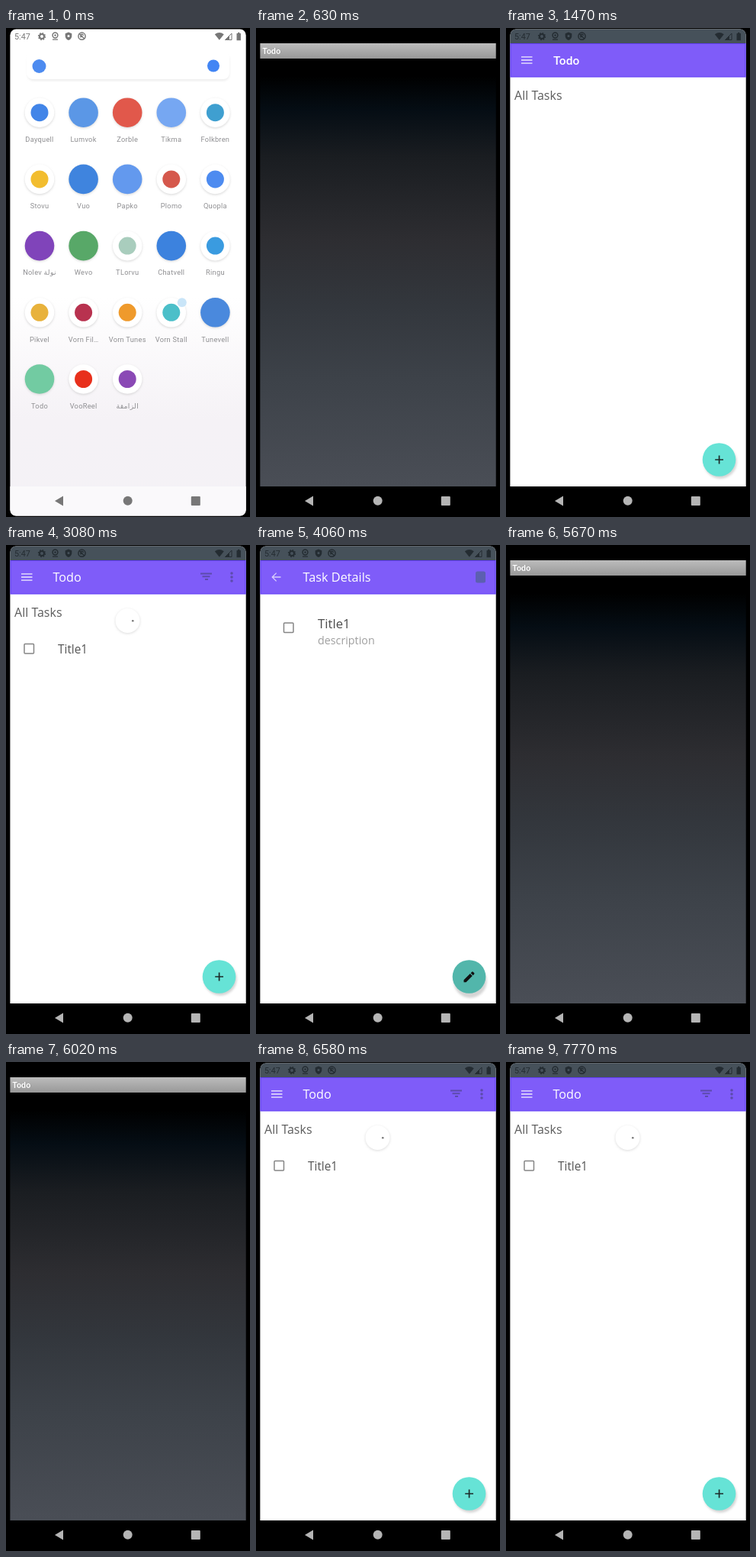
An HTML page that plays this animation: 320 px wide and 640 px high, repeating every 8000 ms.

```html
<!DOCTYPE html>
<html lang="en">
<head>
<meta charset="utf-8">
<title>Todo app</title>
<style>
html, body { margin: 0; height: 100%; overflow: hidden; background: #000; }
svg { display: block; width: 320px; height: 640px; }
text { font-family: "Open Sans", "Noto Sans", sans-serif; }
.ui { font-family: Roboto, sans-serif; }
.label { font: 9.3px Roboto, "DejaVu Sans", sans-serif; letter-spacing: .25px; fill: #8f8f92; text-anchor: middle; }
.line { fill: none; stroke-width: 1.5; }
</style>
</head>
<body>
<svg viewBox="0 0 320 640">
  <defs>
    <linearGradient id="paper" x2="0" y2="1">
      <stop offset=".55" stop-color="#fff"/><stop offset=".8" stop-color="#f5f2f6"/><stop offset="1" stop-color="#f4f2f6"/>
    </linearGradient>
    <linearGradient id="bar" x2="0" y2="1">
      <stop stop-color="#bcbcbc"/><stop offset="1" stop-color="#989898"/>
    </linearGradient>
    <linearGradient id="night" x2="0" y2="1">
      <stop offset=".04" stop-color="#000"/><stop offset=".12" stop-color="#050d14"/>
      <stop offset=".23" stop-color="#1a1d21"/><stop offset=".42" stop-color="#2d2d31"/>
      <stop offset=".58" stop-color="#33373d"/><stop offset=".75" stop-color="#3d4249"/>
      <stop offset="1" stop-color="#4a4e56"/>
    </linearGradient>
    <clipPath id="screen"><rect x="5.4" y="1.4" width="309.3" height="637.2" rx="8"/></clipPath>
    <filter id="soft" x="-30%" y="-30%" width="160%" height="160%"><feGaussianBlur stdDeviation="1.8"/></filter>
  </defs>
  <rect width="320" height="640"/>
  <g clip-path="url(#screen)">
    <g id="home">
      <rect width="320" height="640" fill="url(#paper)"/>
      <rect y="600" width="320" height="40" fill="#faf9fb"/>
      <rect x="28" y="34" width="265" height="35" rx="8" fill="#ddd" opacity=".55" filter="url(#soft)"/>
      <rect x="27" y="31" width="266" height="36" rx="8" fill="#fff"/>
      <circle cx="43.5" cy="50" r="9" fill="#4d8bf0"/>
      <circle cx="272" cy="49.5" r="8" fill="#4285f4"/>
      <g id="icons"></g>
    </g>

    <g id="app">
      <rect width="320" height="600" fill="#fff"/>
      <rect y="600" width="320" height="40"/>
      <rect width="320" height="20" fill="#46515a"/>
      <rect x="5" y="20" width="310" height="44.5" fill="#5f3df5"/>
      <rect x="6.5" y="21" width="307" height="42.5" fill="#7f5cf9"/>
      <g id="list">
        <path class="line" stroke="#d3c7fc" style="stroke-width:1.8" d="M20 37.8h14.5M20 42h14.5M20 46.2h14.5"/>
        <text id="plainTitle" class="ui" x="62" y="48" font-size="15.5" font-weight="500" fill="#fff">Todo</text>
        <text x="11" y="94" font-size="16" fill="#5c5c5c">All Tasks</text>
        <g id="loaded">
          <text x="61.5" y="48.3" font-size="16.2" fill="#fff">Todo</text>
          <rect class="line" x="24" y="129.5" width="12.5" height="12.5" rx="1" stroke="#858585"/>
          <text x="68" y="141.8" font-size="15.4" fill="#555">Title1</text>
          <g id="actions" fill="#5d4bac">
            <path class="line" stroke="#5d4bac" style="stroke-width:2" d="M255 37.5h15M257.5 41.3h10M261 45h4"/>
            <circle cx="296" cy="37" r="1.8"/><circle cx="296" cy="42" r="1.8"/><circle cx="296" cy="47" r="1.8"/>
          </g>
        </g>
        <g id="spinner">
          <circle cx="159.5" cy="100" r="16.3" fill="#ccc" filter="url(#soft)" opacity=".6"/>
          <circle cx="159.5" cy="99" r="16" fill="#fff"/>
          <circle cx="166.3" cy="99.2" r="1.3" fill="#777"/>
        </g>
      </g>
      <g id="details">
        <path class="line" stroke="#d8cdfc" style="stroke-width:1.3" d="M32.5 42H21.5M26.7 36.6L21.3 42L26.7 47.4"/>
        <text x="61.5" y="48.3" font-size="16.3" fill="#fff">Task Details</text>
        <rect x="288" y="34.5" width="13" height="15" rx="2.5" fill="#5c5fb0"/>
        <rect class="line" x="36.5" y="102" width="12.5" height="12.5" rx="1" stroke="#858585"/>
        <text x="81" y="108.5" font-size="16.8" fill="#4c4c4c">Title1</text>
        <text x="81" y="129.5" font-size="14.3" fill="#9f9f9f">description</text>
      </g>
      <circle id="shade" cx="281" cy="568" r="21.7" fill="#aaa" opacity=".5" filter="url(#soft)"/>
      <circle cx="279.5" cy="565" r="21.8" fill="#66e3d6"/>
      <circle id="press" cx="279.5" cy="565" r="21.8"/>
      <path id="plus" class="line" stroke="#1c2b2a" style="stroke-width:1.7" d="M274.2 565h10.8M279.6 559.6v10.8"/>
      <path id="pencil" fill="#111" d="M272.5 572.3v-3l8.3-8.3l3 3l-8.3 8.3zM281.6 560.2l1.5-1.5q.8-.7 1.6 0l1.4 1.4q.7.8 0 1.6l-1.5 1.5z"/>
    </g>

    <g id="boot">
      <rect width="320" height="20"/>
      <rect x="5" y="20" width="310" height="20" fill="url(#bar)"/>
      <rect x="5" y="40" width="310" height="560" fill="url(#night)"/>
      <text class="ui" x="8.5" y="34.3" font-size="11" font-weight="700" fill="#666">Todo</text>
      <text class="ui" x="8.2" y="33.8" font-size="11" font-weight="700" fill="#fff">Todo</text>
    </g>
    <rect id="dark" y="600" width="320" height="40"/>

    <g id="status">
      <text class="ui" x="11" y="15" font-size="10.8">5:47</text>
      <circle class="line" cx="47" cy="11" r="3" stroke="currentColor" style="stroke-width:2"/>
      <circle class="line" cx="47" cy="11" r="4.4" stroke="currentColor" stroke-dasharray="1.7 1.75"/>
      <circle class="line" cx="64.5" cy="9.5" r="3.4" stroke="currentColor"/>
      <circle cx="64.5" cy="9.5" r="1.2"/><path d="M61 14.5h7v1.3h-7z"/>
      <path d="M82 5.5l4.3 1.7v3.5q-.4 4-4.3 5.3q-3.9-1.3-4.3-5.3V7.2z"/>
      <circle id="shieldHole" cx="82" cy="10.5" r="1.5"/>
      <circle class="line" cx="99.5" cy="10.7" r="4.6" stroke="currentColor"/>
      <path class="line" stroke="currentColor" d="M96 7.2l7 7M98 12.5v-3.7q3-1.4 3.5 1"/>
      <path d="M273.8 8.3q6-4.8 12 0l-6 7.5z"/>
      <path class="line" stroke="currentColor" style="stroke-width:1" d="M296 7v8.5h-8.5z"/>
      <path d="M293 10v6h-6z"/>
      <path d="M302.5 7h1.5v-1.2h2.4v1.2h1.5v9.3h-5.4z"/>
    </g>
    <g id="nav">
      <path d="M64 619l11-6.5v13z"/><circle cx="159.7" cy="618.8" r="6"/>
      <rect x="242.8" y="613" width="12" height="12" rx="1"/>
    </g>
  </g>
</svg>
<script>
const $ = id => document.getElementById(id);
// label, colour, and whether the disc sits on a white plate
const apps = [
  ["Dayquell", "#4285e8", 1], ["Lumvok", "#5b97e6"], ["Zorble", "#e1584b"], ["Tikma", "#76a7f2"], ["Folkbren", "#3f9fd0", 1],
  ["Stovu", "#f2bd2f", 1], ["Vuo", "#3f84de"], ["Papko", "#6399ee"], ["Plomo", "#d5584c", 1], ["Quopla", "#4d8bf0", 1],
  ["Nolev نولة", "#8044ba"], ["Wevo", "#58a868"], ["TLorvu", "#a9cdbd", 1], ["Chatvell", "#3c82de"], ["Ringu", "#3a9be0", 1],
  ["Pikvel", "#e8b23c", 1], ["Vorn Fil…", "#b8324f", 1], ["Vorn Tunes", "#ef9a2c", 1], ["Vorn Stall", "#4bbfc9", 1], ["Tunevell", "#4a89dd"],
  ["Todo", "#72cba2"], ["VooReel", "#e8301c", 1], ["الزامقة", "#8a49b5", 1]
];
const disc = (x, y, r, fill, more = "") => `<circle cx="${x}" cy="${y}" r="${r}" fill="${fill}" ${more}/>`;
$("icons").innerHTML = apps.map(([name, colour, plate], i) => {
  const x = 44 + i % 5 * 57.6, y = 110.7 + Math.floor(i / 5) * 87.2;
  return disc(x, y + 1.2, 19.3, "#b5b5b5", 'filter="url(#soft)" opacity=".5"') +
    (plate ? disc(x, y, 19.3, "#fff") : "") + disc(x, y, plate ? 11.5 : 19.3, colour) +
    (name === "Vorn Stall" ? disc(x + 14, y - 13, 6, "#c9e5f8") : "") +
    `<text class="label" x="${x}" y="${y + 38.3}">${name}</text>`;
}).join("");

const clamp = v => Math.min(1, Math.max(0, v));
const ramp = (t, a, b) => clamp((t - a) / (b - a));
const within = (t, a, b) => t >= a && t < b;
const show = (id, on) => $(id).style.display = on ? "" : "none";
const fade = (id, v) => $(id).setAttribute("opacity", v);

function draw(t) {
  const again = t >= 5460;
  const grow = again ? ramp(t, 5460, 5650) : ramp(t, 110, 560);
  const p = 1 - (1 - grow) ** 3;
  const booting = within(t, 110, 1470) || within(t, 5460, 6160);
  const home = t < 560 || within(t, 5460, 5650);
  const detail = within(t, 3640, 5110);
  const loaded = again ? t >= 6230 : t >= 1610;
  const covered = booting && p > .9;

  show("home", home);
  show("app", !home && !booting);
  show("boot", booting);
  // the window opens out of the icon
  $("boot").setAttribute("transform",
    `translate(${24 * (1 - p)} ${440 * (1 - p)}) scale(${.125 + .875 * p} ${.066 + .934 * p})`);
  fade("boot", clamp(grow * 5));
  fade("dark", home ? (booting ? p : 0) : 1);

  show("list", !detail);
  show("details", detail);
  show("plus", !detail);
  show("pencil", detail);
  show("loaded", loaded);
  show("plainTitle", !loaded);
  fade("actions", again ? ramp(t, 6160, 6300) : ramp(t, 1540, 1750));
  show("spinner", within(t, 1680, 3640) || t >= 6300);

  const press = ramp(t, 3850, 3990) * (1 - ramp(t, 4130, 4270));
  fade("press", .2 * press);
  $("shade").setAttribute("cy", 568 + 3 * press);

  show("status", !covered);
  $("status").style.fill = $("status").style.color = home ? "#777" : "#242c32";
  $("shieldHole").style.fill = home ? "#fff" : "#46515a";
  $("nav").style.fill = home && !covered ? "#777" : "#b5b5b5";
}

const start = performance.now();
function tick() {
  draw((performance.now() - start) % 8000);
  requestAnimationFrame(tick);
}
tick();
</script>
</body>
</html>
```
